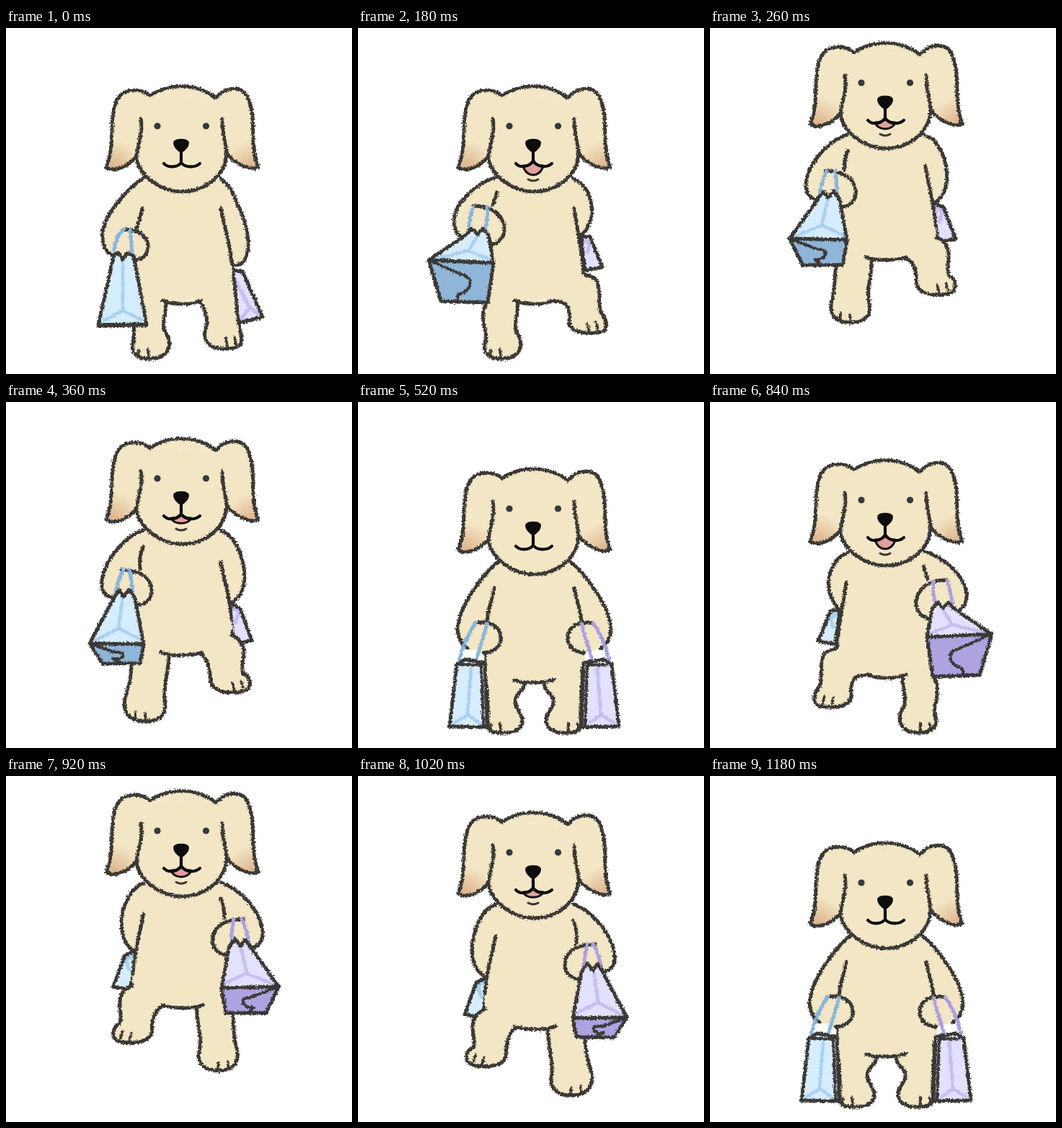
Animation of 480x480 px, one loop 1.32 s. Source, as an HTML page:

```html
<!DOCTYPE html>
<html lang="en">
<head>
<meta charset="utf-8">
<title>Puppy with shopping bags</title>
<style>
  html, body { margin: 0; width: 100%; height: 100%; overflow: hidden; background: #fff; }
  svg { display: block; width: 100vw; height: 100vh; }
  path { stroke-linecap: round; stroke-linejoin: round; }
</style>
</head>
<body>
<svg viewBox="0 0 480 480">
  <defs>
    <filter id="crayon" filterUnits="userSpaceOnUse" x="0" y="0" width="480" height="480" color-interpolation-filters="sRGB">
      <feTurbulence type="fractalNoise" baseFrequency=".42" numOctaves="2" seed="4"/>
      <feDisplacementMap in="SourceGraphic" scale="5.5" xChannelSelector="R" yChannelSelector="G"/>
      <feGaussianBlur stdDeviation=".5"/>
    </filter>
    <radialGradient id="tipL" gradientUnits="userSpaceOnUse" cx="147" cy="198" r="44">
      <stop offset="0" stop-color="#d8a57d" stop-opacity=".9"/><stop offset="1" stop-color="#d8a57d" stop-opacity="0"/>
    </radialGradient>
    <radialGradient id="tipR" gradientUnits="userSpaceOnUse" cx="345" cy="198" r="44">
      <stop offset="0" stop-color="#d8a57d" stop-opacity=".9"/><stop offset="1" stop-color="#d8a57d" stop-opacity="0"/>
    </radialGradient>
  </defs>
  <g id="dog"></g>
</svg>
<script>
const FUR = '#f3e6c5', INK = '#3a3835';
const BLUE = { light: '#d6edff', stripe: '#aacff0', dark: '#8fb5d9', handle: '#88b5dd' };
const LILAC = { light: '#e2e1ff', stripe: '#c7bdf1', dark: '#afa2e1', handle: '#aaa0df' };

// Poses lead with the left bag; the other half of the walk mirrors them.
const step = {
  dy: 0, mouth: 0,
  arm: 'M192,207C165,225 130,265 134,293C135,305 141,313 150,316',
  hand: 'M178,322C188,322 197,315 197,303C197,288 182,278 162,280',
  elbow: 'M189,250Q187,262 181,278',
  leg: 'M222,380C223,396 214,412 222,424C232,440 226,459 198,459C180,459 173,448 176,438C181,425 173,400 179,380',
  toes: 'M184,446L184,456M197,446L198,457',
  crotch: 'M217,378C230,384 258,385 270,378',
  farArm: 'M296,208C312,218 317,233 321,245C335,270 339,300 334,315C330,326 324,330 317,329',
  farSide: 'M298,250C302,275 312,300 313,327',
  farLeg: 'M313,325C315,345 319,365 320,385C321,405 324,415 327,430C329,443 315,445 302,445C280,445 272,432 277,418C281,405 278,392 268,378',
  farToes: 'M305,430L307,441M317,429L319,440',
  farBag: 'M314,335L328,338L356,401L320,410Z',
  farStripe: 'M318,350L338,388L324,406M338,388L352,398',
  front: 'M150,314L156,312L162,321L168,312L177,316L195,411L128,412Z',
  base: 'M128,412L195,411L195,412L128,413Z',
  flap: 'M128,412L160,412Q160,412 160,412Q160,412 160,412L160,412',
  stripe: 'M162,322L162,392L136,406M162,392L188,405',
  handles: 'M150,308Q152,288 164,279M175,312Q174,295 172,280'
};
const swing = {
  dy: 0, mouth: 1,
  arm: 'M192,207C165,215 135,240 133,268C134,282 139,288 146,290',
  hand: 'M186,300C197,298 204,288 203,277C202,260 185,246 160,247',
  elbow: 'M193,228Q190,236 187,246',
  leg: 'M221,378C224,396 214,412 221,424C231,440 226,459 198,459C180,459 173,448 176,438C183,425 166,405 178,382',
  toes: step.toes,
  crotch: step.crotch,
  farArm: 'M296,208C306,212 312,216 315,222C325,236 326,255 323,265C320,276 315,282 310,288',
  farSide: 'M300,250C303,275 311,310 313,340',
  farLeg: 'M292,344C305,338 325,343 331,350C338,365 332,380 337,395C346,405 348,421 335,422C310,426 291,420 293,405C295,388 290,378 268,378',
  farToes: 'M318,410L320,420M330,408L333,418',
  farBag: 'M309,288L322,290L339,332L315,336Z',
  farStripe: 'M311,294L322,299L318,312M310,290L318,296',
  front: 'M150,287L158,278L166,286L173,278L181,287L188,326L98,322Z',
  base: 'M98,322L188,326L180,381L115,379Z',
  flap: 'M98,322L146,343Q158,347 155,355Q155,365 139,370L137,379',
  stripe: 'M166,288L153,309L104,321M153,309L186,322',
  handles: 'M153,280Q155,262 160,248M176,280Q181,262 179,248'
};
const hop = {
  dy: -30, mouth: .6,
  arm: 'M190,178C162,188 135,222 133,250C132,262 138,270 147,271',
  hand: 'M180,282C192,282 202,274 202,262C202,246 190,234 160,233',
  elbow: 'M190,201Q184,215 186,232',
  leg: 'M226,350C226,372 217,396 221,420C222,438 207,444 191,443C170,442 162,430 165,412C170,395 175,380 174,355',
  toes: 'M180,430L179,440M193,432L194,442',
  crotch: 'M215,347C230,354 255,352 272,348',
  farArm: 'M296,178C308,181 316,191 320,199C328,215 331,230 331,243C331,260 323,272 314,278',
  farSide: 'M298,222C302,245 311,270 313,302',
  farLeg: 'M294,321C310,318 328,328 330,345C331,358 325,365 329,377C341,380 342,398 330,401C310,406 286,402 284,388C283,370 280,352 266,348',
  farToes: 'M314,390L317,400M326,387L329,396',
  farBag: 'M309,278L325,287L341,331L316,336Z',
  farStripe: 'M312,284L323,292L318,306M310,280L318,287',
  front: 'M150,271L157,261L163,270L171,260L179,272L191,336L116,335Z',
  base: 'M116,335L191,336L186,362L134,363Z',
  flap: 'M116,335L150,347Q163,347 162,350Q163,358 148,356L160,362',
  stripe: 'M162,270L156,314L122,332M156,314L188,330',
  handles: 'M152,266Q155,245 163,233M176,264Q174,247 171,233'
};
const stand = {
  dy: 12, mouth: 0, both: true,
  arm: 'M196,220C174,238 140,282 138,315C139,328 145,337 152,342',
  hand: 'M175,348C188,347 198,340 198,328C198,313 184,302 163,307',
  elbow: 'M189,258C187,272 181,285 179,303',
  leg: 'M231,391C231,401 217,405 218,416C219,428 230,434 228,444C226,456 212,460 198,459C180,459 178,452 180,440C182,420 176,400 178,350',
  toes: step.toes,
  crotch: 'M217,386C232,391 258,390 272,385',
  front: 'M137,364L148,357L176,362L179,451L127,450Z',
  base: '',
  flap: 'M137,364L171,365L174,450',
  stripe: 'M157,368L152,434L134,445M152,434L168,445',
  handles: 'M140,360Q147,330 163,306M164,358Q173,330 179,307'
};

const lerp = (a, b, t) => a + (b - a) * t;
function blend(a, b, t, lift = 0) {
  const out = {};
  for (const key in a) {
    if (typeof a[key] === 'number') { out[key] = lerp(a[key], b[key], t); continue; }
    const goal = b[key].match(/-?[\d.]+/g);
    let i = 0;
    out[key] = a[key].replace(/-?[\d.]+/g, n => {
      const v = lerp(+n, +goal[i], t);
      return (i++ % 2 ? v - lift : v).toFixed(1);
    });
  }
  out.dy -= lift;
  return out;
}

const poses = [
  step, blend(step, swing, .5), swing, blend(swing, hop, .7, 39),
  hop, blend(hop, step, .85), stand
];
const starts = [0, 80, 180, 260, 360, 440, 520];
const HALF = 660;

const path = (d, fill = 'none', stroke = INK, width = 4.9) =>
  `<path d="${d}" fill="${fill}" stroke="${stroke}" stroke-width="${width}"/>`;
const area = (d, fill = FUR) => path(d, fill, 'none');
const mirror = s => `<g transform="matrix(-1 0 0 1 489 0)">${s}</g>`;
// Fills a limb right up to a point inside the torso, so that no gap is left.
const joined = (d, x, y) => area(`${d}L${x},${y}Z`);

const nearBag = (p, c) =>
  path(p.handles, 'none', c.handle, 5) +
  area(p.front, c.light) + path(p.stripe, 'none', c.stripe, 4.5) + path(p.front) +
  (p.base && path(p.base, c.dark)) + path(p.flap, 'none', INK, 4);

const nearLeg = p =>
  joined(p.leg, 200, 355 + p.dy) + path(p.leg) + path(p.toes, 'none', INK, 3.5);

const nearArm = (p, c) =>
  joined(p.arm + p.hand.replace('M', 'L'), 240, 280 + p.dy) +
  path(p.arm) + path(p.hand) + path(p.elbow) + nearBag(p, c);

const farLimbs = (p, c) =>
  area(p.farBag, c.light) + path(p.farStripe, 'none', c.stripe, 5) + path(p.farBag) +
  joined(p.farArm, 250, 280 + p.dy) + path(p.farArm) +
  path(p.farLeg, FUR) + path(p.farToes, 'none', INK, 3.5);

const torso = p =>
  `<g transform="translate(0 ${p.dy})">` +
  area('M192,207L296,208L300,250C302,275 313,310 314,345L300,376L179,380Q176,310 188,250Z') +
  '</g>' + path(p.crotch, FUR);

function body(p, near, far) {
  if (p.both) {
    return nearLeg(p) + mirror(nearLeg(p)) + torso(p) +
      nearArm(p, near) + mirror(nearArm(p, far));
  }
  return farLimbs(p, far) + nearLeg(p) + torso(p) + path(p.farSide) + nearArm(p, near);
}

function head() {
  const earL = 'M200,94C188,83 161,82 153,102C142,130 152,162 139,193C150,201 172,192 182,176';
  const earR = 'M291,97C305,81 329,78 337,100C348,130 337,160 350,193C340,199 316,188 306,173';
  return [[earL, 'tipL'], [earR, 'tipR']].map(([d, tip]) =>
    area(d) + area(d, `url(#${tip})`) + path(d)).join('') +
    area('M200,94L291,97L300,128L187,128Z') +
    path('M200,94C225,76 265,76 291,97', FUR) +
    path('M187,126C191,142 183,160 181,180C185,205 215,227 243,227C278,227 306,203 306,172C304,155 300,145 300,126', FUR);
}

function face(open) {
  const lip = 187 - 3 * open, low = 190 + 18 * open, chin = 200 + 10 * open;
  const eye = x => `<circle cx="${x}" cy="136" r="4.6" fill="#343a3e"/>`;
  const ink = '#0d0d0d';
  const tongue = `M229,191C236,191 240,189 243,${lip + 2}C246,189 250,191 257,191C253,${low} 233,${low} 229,191`;
  return eye(210) + eye(277.5) +
    (open > .2 ? path(tongue, '#e2a09b', ink, 3) +
      path(`M236,${chin}Q243,${chin + 4} 250,${chin}`, 'none', INK, 3) : '') +
    path('M233.5,158C237,154 249,154 252.5,158C254,164 247,170 243,172C239,170 232,164 233.5,158Z', ink, ink, 2.4) +
    path(`M243,170V${lip}M219,188C224,194 237,194 243,${lip}C249,194 262,194 269,188`, 'none', ink, 4.2);
}

const dog = document.getElementById('dog');
let shown = -1;
function draw(ms) {
  const t = ms % (2 * HALF), flipped = t >= HALF;
  const index = starts.findLastIndex(s => s <= t % HALF);
  const id = index + (flipped ? poses.length : 0);
  if (id === shown) return;
  shown = id;
  const p = poses[index];
  const figure = flipped && !p.both ? mirror(body(p, LILAC, BLUE)) : body(p, BLUE, LILAC);
  const shift = `transform="translate(0 ${p.dy})"`;
  dog.innerHTML = `<g filter="url(#crayon)">${figure}<g ${shift}>${head()}</g></g><g ${shift}>${face(p.mouth)}</g>`;
}

const begin = performance.now();
function tick() {
  draw(performance.now() - begin);
  requestAnimationFrame(tick);
}
tick();
</script>
</body>
</html>
```
